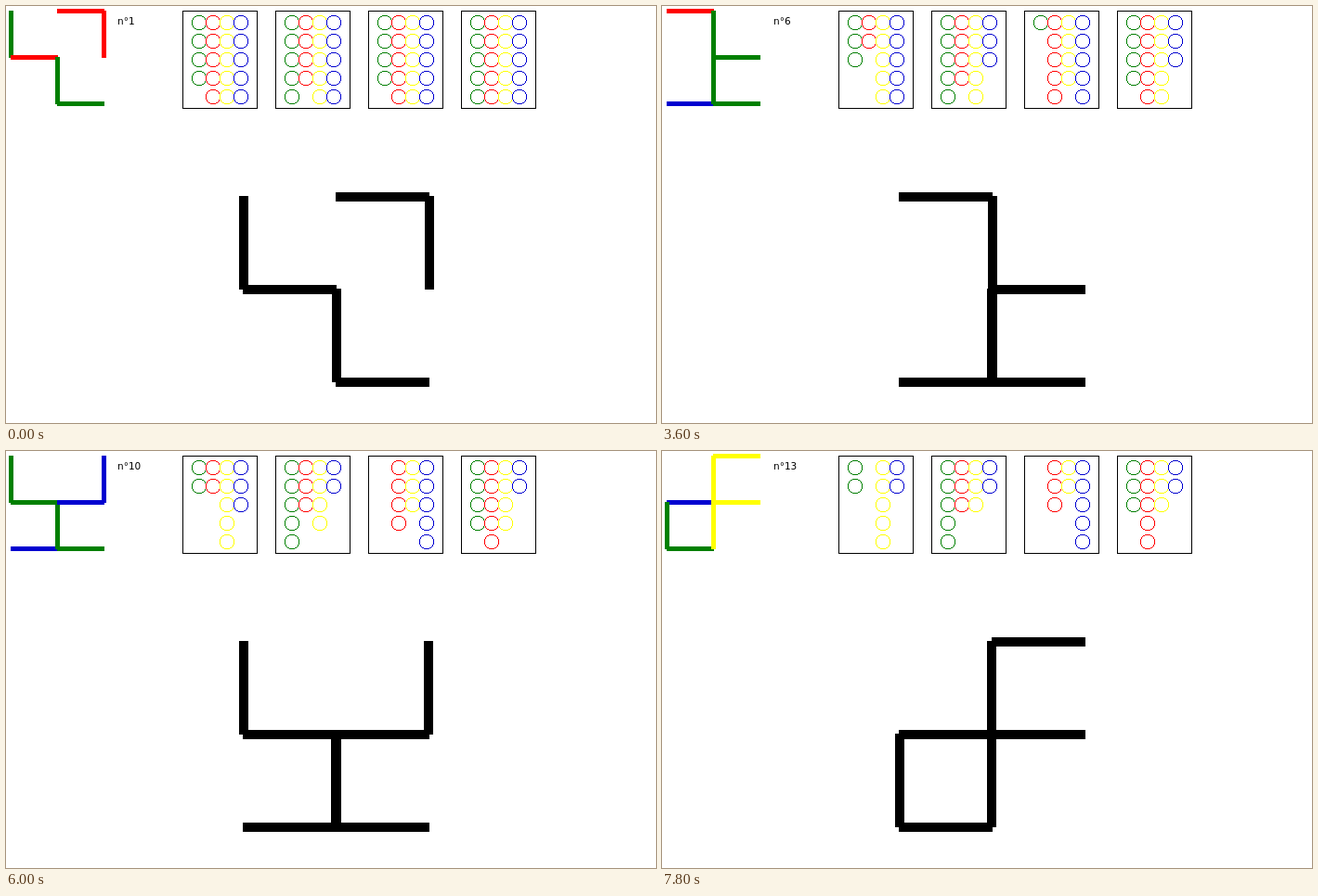
An HTML page with a canvas that plays this animation: 700x450 px, repeating every 8000 ms.

```html
<!DOCTYPE html>
<html lang="fr">
<head>
<meta charset="utf-8">
<title>Quatre boîtes</title>
<style>
  html, body { margin: 0; width: 100%; height: 100%; overflow: hidden; background: #fff; }
  canvas { display: block; }
  #label {
    position: absolute; left: 120px; top: 9px;
    font: 10.5px/14px "DejaVu Sans", sans-serif; color: #000; white-space: pre;
  }
</style>
</head>
<body>
<canvas id="stage" width="700" height="450"></canvas>
<div id="label">n°1</div>
<script>
const ctx = document.getElementById('stage').getContext('2d');
const label = document.getElementById('label');

const LOOP = 8000, STEP = 600, BALLS = 5;
const COLORS = { g: '#008000', r: '#ff0000', y: '#ffff00', b: '#0000d0' };
const SIDES = { g: ['left', 'bottom'], r: ['top', 'right'], y: ['top', 'left'], b: ['right', 'bottom'] };

// Cells in drawing order: top left, bottom left, bottom right, top right.
const CELLS = [[0, 0], [0, 1], [1, 1], [1, 0]];
const GOAL = 'ygbr';
const DRAWS = ['grgr', 'gbgr', 'rgbr', 'rgyb', 'yggb', 'rbgg', 'byrr',
               'brbr', 'ygyy', 'gbgb', 'ryrg', 'rgbr', 'bgyy'];

function bar(side, x, y, size, width, shift) {
  if (side === 'right') x += size;
  if (side === 'bottom') y += size;
  if (side === 'left' || side === 'right') ctx.fillRect(x - shift, y, width, size + 1);
  else ctx.fillRect(x, y - Math.floor((width - 1) / 2), size + 1, width);
}

function figure(draw, x, y, size, width, black) {
  CELLS.forEach(([col, row], i) => {
    const c = draw[i];
    // Even widths cannot be centred: yellow and blue uprights lean left.
    const lean = width % 2 === 0 && 'yb'.includes(c) ? 1 : 0;
    ctx.fillStyle = black ? '#000' : COLORS[c];
    for (const side of SIDES[c])
      bar(side, x + col * size, y + row * size, size, width, Math.floor((width - 1) / 2) + lean);
  });
}

// One-pixel circle without smoothing, 16 pixels across.
function ring(x, y) {
  const r = 7.5;
  for (let i = 0; i < 16; i++) {
    const j = Math.ceil(r - Math.sqrt(r * r - (i - r) ** 2) - 0.5);
    for (const k of [j, 15 - j]) {
      ctx.fillRect(x + i, y + k, 1, 1);
      ctx.fillRect(x + k, y + i, 1, 1);
    }
  }
}

// A ball leaves its box each time it was drawn wrongly.
function ballsLeft(box, color, step) {
  if (GOAL[box] === color) return BALLS;
  return BALLS - DRAWS.slice(0, step).filter(d => d[box] === color).length;
}

function boxes(step) {
  for (let box = 0; box < 4; box++) {
    const x = 190 + box * 100;
    ctx.strokeStyle = '#000';
    ctx.strokeRect(x + 0.5, 5.5, 80, 105);
    Object.keys(COLORS).forEach((color, col) => {
      ctx.fillStyle = COLORS[color];
      for (let row = 0; row < ballsLeft(box, color, step); row++)
        ring(x + 10 + col * 15, 10 + row * 20);
    });
  }
}

function render(step) {
  const draw = DRAWS[step - 1];
  ctx.fillStyle = '#fff';
  ctx.fillRect(0, 0, 700, 450);
  figure(draw, 5, 5, 50, 5, false);
  figure(draw, 255, 205, 100, 10, true);
  boxes(step);
  label.textContent = 'n°' + step;
}

let shown = 0;
function tick() {
  const step = Math.max(1, Math.floor(performance.now() % LOOP / STEP));
  if (step !== shown) render(shown = step);
  requestAnimationFrame(tick);
}
tick();
</script>
</body>
</html>
```
